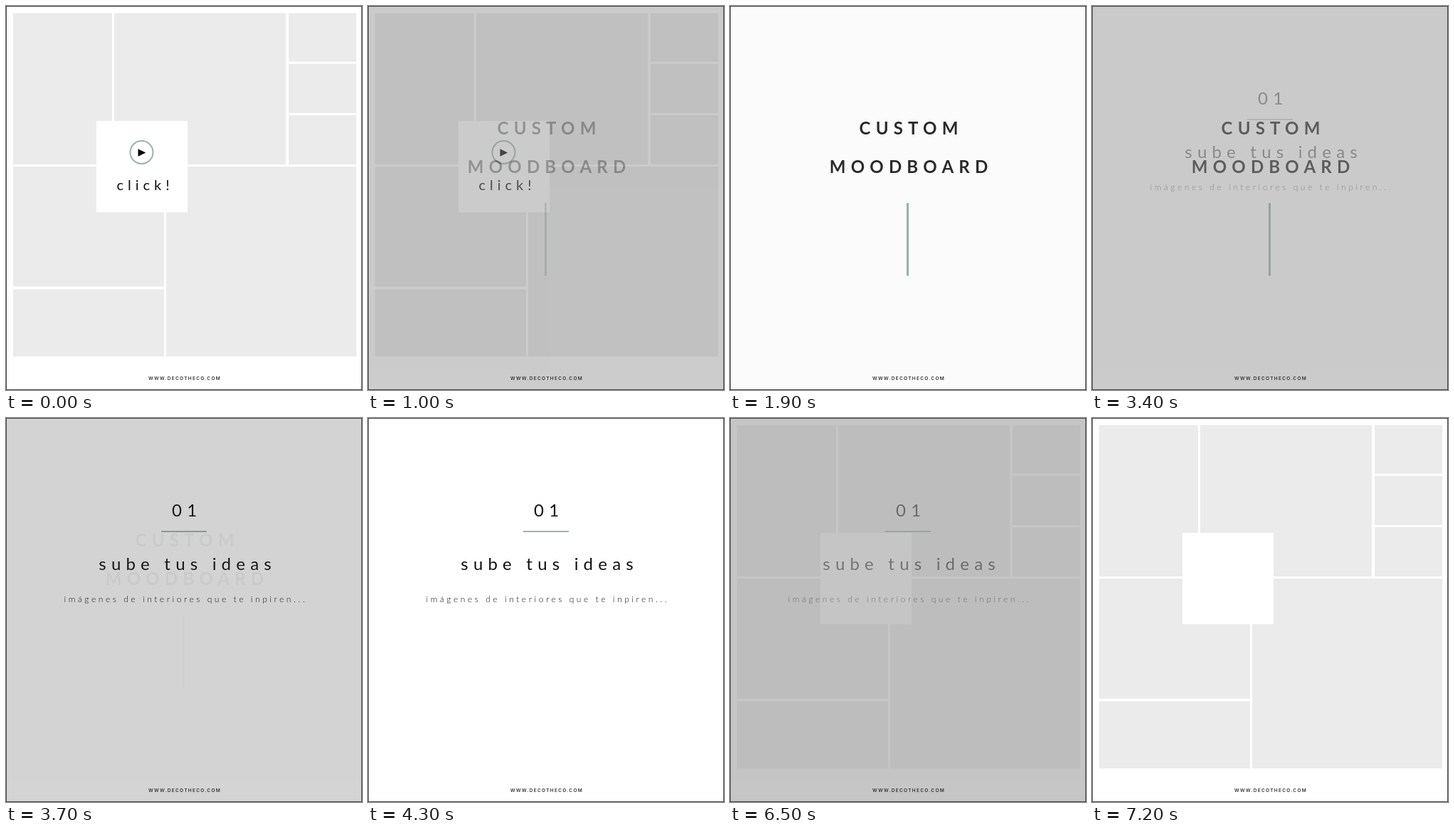
Recreate the animation shown at these times as an HTML page. Size 500 by 538 pixels, loop 8 s.

```html
<!DOCTYPE html>
<html lang="es">
<head>
<meta charset="utf-8">
<title>Custom moodboard</title>
<style>
  html, body { margin: 0; width: 100%; height: 100%; overflow: hidden; background: #fff; }
  svg { display: block; width: 500px; height: 538px; }
  text { font-family: Lato, sans-serif; text-anchor: middle; fill: #111; }
  .big { font-size: 24px; letter-spacing: 7.2px; }
  .title { font-weight: 700; fill: #2b2b2b; }
  .note { font-size: 12px; font-weight: 300; letter-spacing: 3.55px; }
  .click { font-size: 20px; letter-spacing: 6px; }
  .site { font: 600 6.5px Inter, sans-serif; letter-spacing: 1.3px; fill: #333; }
</style>
</head>
<body>
<svg viewBox="0 0 500 538">
  <rect width="500" height="538" fill="#000"/>

  <g id="board">
    <rect width="500" height="538" fill="#fff"/>
    <g id="tiles" fill="#ebebeb"></g>
    <rect x="127" y="161" width="128" height="128" fill="#fff"/>
    <g id="click">
      <circle cx="190.5" cy="205" r="16" fill="none" stroke="#9db2aa" stroke-width="2"/>
      <path d="M185.5 200.3L196.3 205.5L185.5 210.7Z" fill="#000"/>
      <text class="click" x="195.5" y="257.5">click!</text>
    </g>
  </g>

  <g id="title">
    <rect width="500" height="538" fill="#fbfbfb"/>
    <text class="big title" x="254.6" y="179.5">CUSTOM</text>
    <text class="big title" x="254.6" y="233.5">MOODBOARD</text>
    <rect x="248" y="276" width="3" height="102" fill="#9ab0a8"/>
  </g>

  <g id="idea">
    <rect width="500" height="538" fill="#fff"/>
    <text class="big" x="254.2" y="138">01</text>
    <rect x="218" y="158" width="64" height="2" fill="#a5b3ad"/>
    <text class="big" x="255.1" y="213">sube tus ideas</text>
    <text class="note" x="252.3" y="258">imágenes de interiores que te inpiren...</text>
  </g>

  <text class="site" x="251" y="524">WWW.DECOTHECO.COM</text>
  <rect x=".5" y=".5" width="499" height="537" fill="none" stroke="#444"/>
</svg>
<script>
const LOOP = 8000, STEP = 100, STEPS = 10;
const $ = id => document.getElementById(id);
const scenes = { board: $('board'), title: $('title'), idea: $('idea') };
const cuts = [
  { at: 1000, from: 'board', to: 'title' },
  { at: 3400, from: 'title', to: 'idea' },
  { at: 6300, from: 'idea', to: 'board' }
];

// left, top, right, bottom
const tiles = [
  [10, 10, 149, 222], [152, 10, 393, 222],
  [397, 10, 492, 78], [397, 81, 492, 150], [397, 153, 492, 222],
  [10, 225, 222, 393], [10, 397, 222, 491], [225, 225, 492, 491]
];
for (const [l, t, r, b] of tiles) {
  const rect = document.createElementNS('http://www.w3.org/2000/svg', 'rect');
  const box = { x: l, y: t, width: r - l, height: b - t };
  for (const key in box) rect.setAttribute(key, box[key]);
  $('tiles').append(rect);
}

const easeOut = p => 1 - (1 - p) ** 3;

// Both scenes are translucent over black, so each fade dips to grey.
function draw(t) {
  const alpha = { board: 0, title: 0, idea: 0 };
  const cut = cuts.filter(c => t >= c.at).pop();
  if (cut) {
    const n = Math.min(STEPS, Math.floor((t - cut.at) / STEP) + 1);
    const q = easeOut(n / STEPS);
    alpha[cut.from] = 1 - q;
    alpha[cut.to] = q;
  } else {
    alpha.board = 1;
  }
  for (const name in scenes) {
    scenes[name].setAttribute('opacity', alpha[name]);
    scenes[name].setAttribute('display', alpha[name] ? 'inline' : 'none');
  }
  $('click').setAttribute('display', t < cuts[2].at ? 'inline' : 'none');
}

const start = performance.now();
function tick() {
  draw((performance.now() - start) % LOOP);
  requestAnimationFrame(tick);
}
tick();
</script>
</body>
</html>
```
